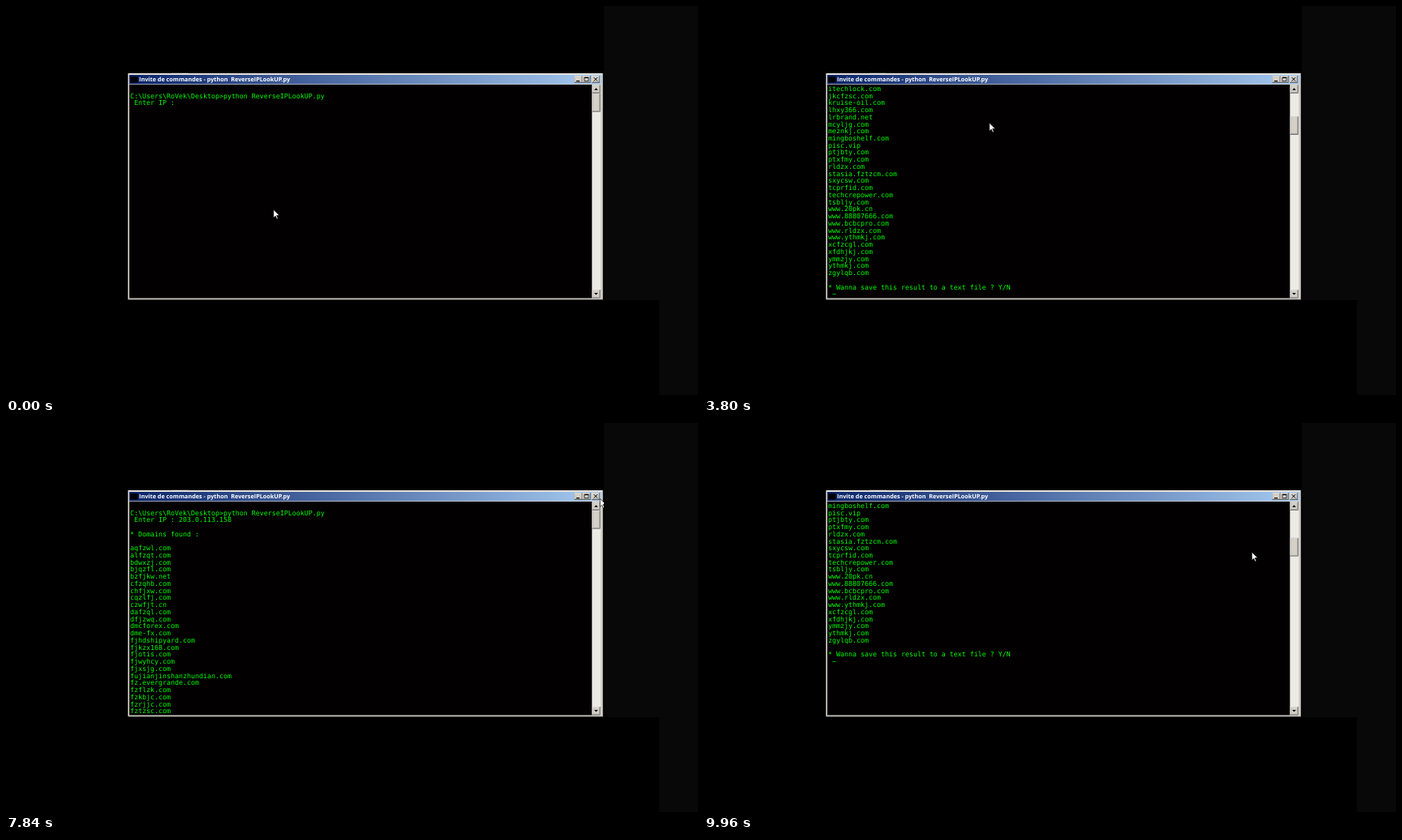
An HTML page with a canvas that plays this animation: 853 px wide and 480 px high, repeating every 10 s.

```html
<!DOCTYPE html>
<html lang="fr">
<head>
<meta charset="utf-8">
<title>Reverse IP lookup</title>
<style>
html, body { margin: 0; width: 100%; height: 100%; overflow: hidden; background: #000; }
canvas { display: block; }
</style>
</head>
<body>
<canvas id="stage" width="853" height="480"></canvas>
<script>
const ctx = document.getElementById('stage').getContext('2d');
const LOOP = 10000, ROW = 8.742, COL = 5, LEFT = 153, TOP = 97.2, ROWS = 30;
const FACE = '#d4d0c8', NAVY = '#0a246a';
const MONO = '8.306px "DejaVu Sans Mono", monospace';
const UI = '6.55px "Open Sans", sans-serif';
const UI_BOLD = 'bold 7.25px "Open Sans", sans-serif';

const IP = '203.0.113.158';
const ENTER = ' Enter IP : ';
const domains = `aqfzwl.com alfzqt.com bdwxzj.com bjqzfl.com bzfjkw.net cfzqhb.com chfjxw.com cqzlfj.com
czwfjt.cn dafzql.com dfjzwq.com
dmcforex.com dme-fx.com fjhdshipyard.com fjkzx168.com fjotis.com fjwyhcy.com fjxsjg.com
fujianjinshanzhundian.com fz.evergrande.com fzflzk.com fzkbjc.com fzrjjc.com fztzsc.com
greatlandwear.com haixiatv.net huake-rfid.com huarongmarine.cn hylace.com
itechlock.com jkcfzsc.com kruise-oil.com lhxy366.com lrbrand.net mcyljg.com meznkj.com
mingboshelf.com pisc.vip ptjbty.com ptxfmy.com rldzx.com stasia.fztzcm.com sxycsw.com
tcprfid.com techcrepower.com tsbljy.com www.20pk.cn www.88807666.com www.bcbcpro.com
www.rldzx.com www.ythmkj.com xcfzcgl.com xfdhjkj.com ymmzjy.com ythmkj.com zgylqb.com`.split(/\s+/);
const lines = ['', 'C:\\Users\\RoVek\\Desktop>python ReverseIPLookUP.py', ENTER,
  '', '* Domains found :', '', ...domains, '',
  '* Wanna save this result to a text file ? Y/N', ' ~ '];
const menu = ['Sélectionner', 'Copier', 'Coller', 'Sélectionner tout', 'Défilement', 'Rechercher...'];

// Pointer path: time, x, y
const path = [
  [200, 329.5, 251], [400, 325, 117], [1080, 325, 117], [1600, 346, 139], [1880, 346, 139],
  [2000, 350, 162], [2160, 349, 146], [2320, 349, 146], [2680, 351.5, 144], [5200, 351.5, 144],
  [6000, 606, 170], [6200, 606, 170], [6800, 732, 148], [7240, 732, 149.5], [7700, 732, 90],
  [8240, 732, 108], [8480, 731, 135], [8900, 731, 149.5], [9000, 731, 149.5], [9280, 731, 155.5],
  [9500, 732, 162], [9680, 731, 155.2], [9840, 731, 155.2], [9960, 675, 159]
];

const clamp = (v, lo, hi) => Math.max(lo, Math.min(hi, v));

function pointer(t) {
  const next = path.findIndex(p => p[0] >= t);
  if (next === 0) return path[0].slice(1);
  if (next < 0) return path[path.length - 1].slice(1);
  const [t0, x0, y0] = path[next - 1], [t1, x1, y1] = path[next];
  const u = (t - t0) / (t1 - t0), k = u * u * (3 - 2 * u);
  return [x0 + (x1 - x0) * k, y0 + (y1 - y0) * k];
}

function rect(x, y, w, h, color) {
  ctx.fillStyle = color;
  ctx.fillRect(x, y, w, h);
}

function text(s, x, y, font, color) {
  ctx.font = font;
  ctx.fillStyle = color;
  ctx.fillText(s, x, y);
}

function stroke(d, color, width) {
  ctx.strokeStyle = color;
  ctx.lineWidth = width;
  ctx.stroke(new Path2D(d));
}

function bevel(x, y, w, h) {
  rect(x, y, w, h, '#404040');
  rect(x, y, w - .7, h - .7, '#fff');
  rect(x + .7, y + .7, w - 1.4, h - 1.4, '#808080');
  rect(x + .7, y + .7, w - 2, h - 2, FACE);
}

function drawWindow(top) {
  rect(737, 0, 116, 363, '#080808');
  rect(805, 363, 48, 117, '#080808');
  rect(204, 82, 21, 1, '#333');
  rect(150.5, 83, 585.5, 279.5, '#808080');
  rect(150.5, 83, 584.8, 278.8, FACE);
  rect(151.2, 83.6, 583.5, .7, '#fff');

  const bar = ctx.createLinearGradient(152, 0, 733, 0);
  bar.addColorStop(0, NAVY);
  bar.addColorStop(1, '#a6caf0');
  rect(152, 85, 582, 11.3, bar);
  rect(153.5, 87, 9, 7.5, '#000');
  text('Invite de commandes - python\u00a0 ReverseIPLookUP.py', 164, 93.3, UI_BOLD, '#fff');
  for (const x of [700.5, 710.5, 722]) bevel(x, 86, 10, 8.8);
  rect(703, 92, 4, 1.2, '#000');
  stroke('M713 88.2H718V92.6H713Z', '#000', .7);
  stroke('M713 88.5H718', '#000', 1.2);
  stroke('M724.7 88.2L729 92.5M729 88.2L724.7 92.5', '#000', 1);

  rect(152, 97, 570.5, 263.5, '#020001');
  rect(722.5, 97, 10.5, 263.5, '#eceae5');
  bevel(722.5, 97.2, 10, 10.4);
  bevel(722.5, 350, 10, 10.4);
  ctx.fillStyle = '#000';
  ctx.fill(new Path2D('M725 103.7L727.4 101.2L729.8 103.7ZM725 354L727.4 356.5L729.8 354Z'));
  bevel(722.5, 108 + top * .807, 10, 22.5);
}

function drawConsole(t, top, count) {
  ctx.save();
  ctx.beginPath();
  ctx.rect(152, 97, 570.5, 263.5);
  ctx.clip();
  const pasted = t >= 2360 ? IP : '';
  for (let row = 0; row < ROWS && top + row < count; row++) {
    const i = top + row;
    text(lines[i] + (i === 2 ? pasted : ''), LEFT, TOP + 7.6 + row * ROW, MONO, '#0f0');
  }
  const phase = t < 7240 ? 384 : 9350;
  const printing = t >= 3600 && t < 4600;
  if (!printing && Math.floor((t - phase) / 531) % 2 === 0) {
    const col = count > 3 ? 3 : ENTER.length + pasted.length;
    const row = count - 1 - top;
    if (t >= 384) rect(LEFT + col * COL, TOP + row * ROW + .2, 5, 8.7, '#c0c0c0');
  }
  ctx.restore();
}

function drawMenu(y) {
  bevel(324.5, 117, 102, 67);
  const hot = Math.floor((y - 118.6) / 10.6);
  menu.forEach((label, i) => {
    const base = 126 + i * 10.6, disabled = i === 1;
    if (i === hot) rect(326, 118.6 + i * 10.6, 99.2, 10.6, NAVY);
    const color = disabled ? '#808080' : i === hot ? '#fff' : '#000';
    const write = (dx, c) => {
      text(label, 336.5 + dx, base + dx, UI, c);
      if (disabled) text('Entrée', 392.5 + dx, base + dx, UI, c);
    };
    if (disabled && i !== hot) write(.6, '#fff');
    write(0, color);
  });
}

function drawPointer(x, y) {
  ctx.save();
  ctx.beginPath();
  ctx.rect(0, 0, 737, 480);
  ctx.clip();
  ctx.translate(x, y);
  ctx.scale(.625, .625);
  const arrow = new Path2D('M.5 .5V16.5L4.3 13L7 19L9.3 18L6.7 12H12Z');
  ctx.fillStyle = '#fff';
  ctx.fill(arrow);
  ctx.strokeStyle = '#000';
  ctx.lineWidth = 1;
  ctx.stroke(arrow);
  ctx.restore();
}

function draw(t) {
  const [x, y] = pointer(t);
  const count = 3 + Math.round(clamp((t - 3580) / 180, 0, 1) * (lines.length - 3));
  // Dragging the thumb ties the view to the pointer height.
  const top = t < 7240 ? Math.max(0, count - ROWS)
    : t > 9680 ? 42 : clamp(Math.round((y - 121.25) * 1.239), 0, 270);
  rect(0, 0, 853, 480, '#000');
  drawWindow(top);
  drawConsole(t, top, count);
  if (t >= 1080 && t < 2340) drawMenu(y);
  drawPointer(x, y);
}

ctx.textRendering = 'geometricPrecision';
const start = performance.now();
function tick() {
  const t = (performance.now() - start) % LOOP;
  draw(Math.floor(t / 40) * 40);
  requestAnimationFrame(tick);
}
tick();
</script>
</body>
</html>
```
